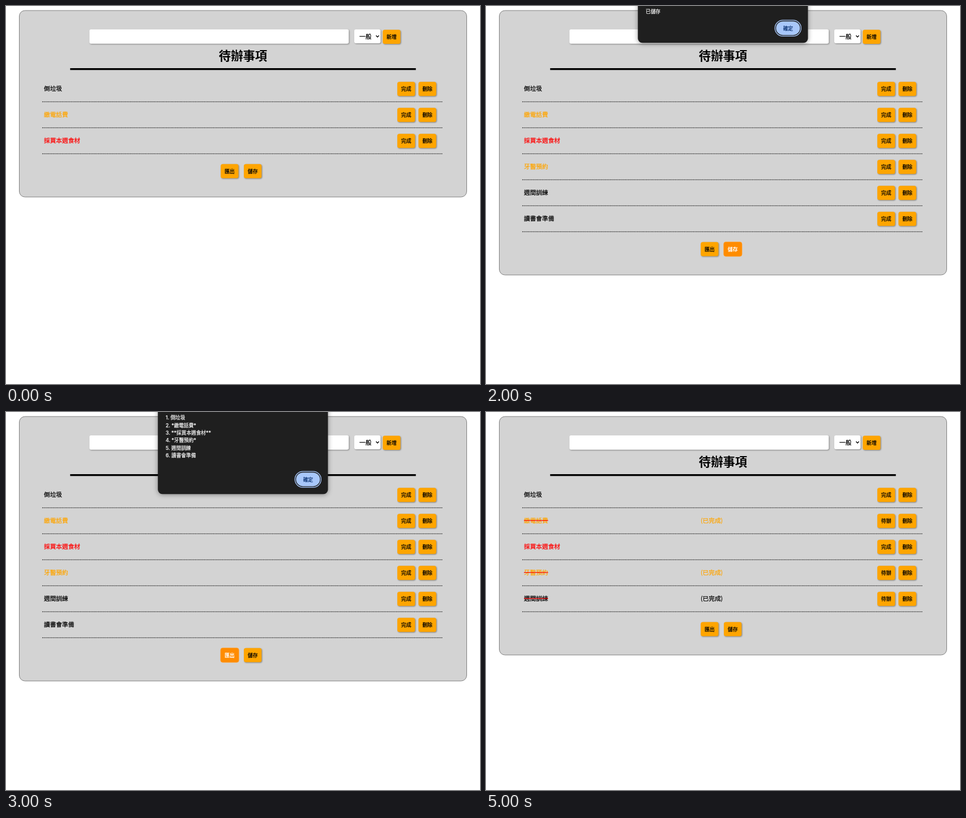
Recreate the animation shown at these times as an HTML page. Size 837 by 669 pixels, loop 6000 ms.

```html
<!DOCTYPE html>
<html lang="zh-Hant">
<head>
<meta charset="utf-8">
<title>待辦事項</title>
<style>
  html, body { margin: 0; width: 100%; height: 100%; overflow: hidden; background: #fff; }
  svg { display: block; width: 837px; height: 669px; }
  /* The thin stroke gives the regular face a medium weight. */
  text {
    font-family: "Noto Sans CJK TC", "Noto Sans CJK JP", "Noto Sans CJK", sans-serif;
    font-weight: 500; stroke: currentColor; stroke-width: .25px;
  }
  .bold { font-weight: 700; stroke: none; }
  .dialog text { font-family: Inter, "Noto Sans CJK TC", "Noto Sans CJK JP", "Noto Sans CJK", sans-serif; }
  .raised { filter: drop-shadow(1.33px 1.33px 1.2px #808080); }
  .floating { filter: drop-shadow(0 1.5px 4px rgba(0, 0, 0, .4)); }
</style>
</head>
<body>
<svg id="stage" viewBox="0 0 837 669" xmlns="http://www.w3.org/2000/svg"></svg>
<script>
const STEP = 1000;
const ROW = 46;
const ITEMS = [
  ['倒垃圾', '#000'],
  ['繳電話費', 'orange'],
  ['採買本週食材', 'red'],
  ['牙醫預約', 'orange'],
  ['週間訓練', '#000'],
  ['讀書會準備', '#000']
];
const EXPORTED = ITEMS.map(([name, color], i) => {
  const mark = { orange: '*', red: '**' }[color] || '';
  return `${i + 1}. ${mark}${name}${mark}`;
});
const DONE = [1, 3, 4, 5];

// focus and hover name a button: "add", "save", "export", "toggle5", ...
const STATES = [
  { rows: 3 },
  { rows: 6, focus: 'add' },
  { rows: 6, hover: 'save', dialog: ['已儲存'], dialogBottom: 65.3 },
  { rows: 6, hover: 'export', dialog: EXPORTED, dialogBottom: 145.3 },
  { rows: 6, done: DONE, focus: 'toggle5', hover: 'remove5' },
  { rows: 5, done: DONE }
];

const rect = (x, y, w, h, r, fill, extra = '') =>
  `<rect x="${x}" y="${y}" width="${w}" height="${h}" rx="${r}" fill="${fill}" ${extra}/>`;

// Places text by the vertical middle of its glyphs.
const label = (str, x, middle, size, color = '#000', extra = '') =>
  `<text x="${x}" y="${middle + size * 0.38}" font-size="${size}" fill="${color}" color="${color}" ${extra}>${str}</text>`;

const centered = 'text-anchor="middle"';
const bold = 'class="bold"';

function button(state, id, str, x, y) {
  const w = 31.3, h = 25;
  const hover = state.hover === id;
  let out = hover
    ? rect(x - 0.4, y - 0.4, w + 1.2, h + 0.8, 4, '#ff8c00', 'stroke="#ffa640" stroke-width=".6"')
    : rect(x, y, w, h, 3.5, 'orange', 'class="raised"');
  if (state.focus === id) {
    out += rect(x - 0.9, y - 0.9, w + 1.8, h + 1.8, 4, 'none', 'stroke="#fff"') +
      rect(x, y, w, h, 3.5, 'none', 'stroke="#10479f" stroke-width="1.4"');
  }
  return out + label(str, x + w / 2, y + 12.4, 8.9, hover ? '#fff' : '#000',
    `${centered} ${hover ? bold : ''}`);
}

function header(state) {
  return rect(147.3, 41.3, 458, 25.4, 3, '#fff', 'class="raised"') +
    rect(615, 41.3, 46.5, 24.8, 3, '#fff', 'class="raised"') +
    label('一般', 624, 53.7, 10.67) +
    '<path d="M653.4 52.2l2.6 2.7l2.6-2.7" fill="none" stroke="#000" stroke-width="1.4"/>' +
    button(state, 'add', '新增', 665.3, 42) +
    label('待辦事項', 418.5, 88.2, 21.33, '#000', `${centered} ${bold}`) +
    rect(113.3, 110, 610.4, 3.3, 0, '#000');
}

function row(state, i) {
  const [name, color] = ITEMS[i];
  const top = 134.3 + i * ROW;
  const middle = top + 11.5;
  const done = (state.done || []).includes(i);
  let out = label(name, 67, middle, 10.67, color);
  if (done) {
    out += rect(67, middle - 0.4, name.length * 10.67, 1.4, 0, 'red', 'opacity=".85"') +
      label('(已完成)', 379, middle + 0.3, 10.67, color);
  }
  return out +
    button(state, 'toggle' + i, done ? '待辦' : '完成', 691, top) +
    button(state, 'remove' + i, '刪除', 728.4, top) +
    `<path d="M64.7 ${top + 35.2}H770" stroke="#000" stroke-width="1.5" stroke-linecap="round" stroke-dasharray="0 2.67"/>`;
}

function dialog({ dialog: lines, dialogBottom: bottom }) {
  if (!lines) return '';
  const y = bottom - 40;
  return '<g class="dialog">' +
    rect(268.2, -20, 300.3, bottom + 20, 8, '#1f1f1f', 'class="floating"') +
    lines.map((line, i) => label(line, 282, 10.2 + i * 13.33, 8.67, '#eee')).join('') +
    rect(510.2, y - 0.1, 46.2, 28.2, 14.1, 'none', 'stroke="#a8c7fa" stroke-width="1.3"') +
    rect(512.2, y + 1.9, 42.2, 24.2, 12.1, '#a8c7fa') +
    label('確定', 533.3, y + 14, 8.67, '#062e6f', centered) +
    '</g>';
}

function draw(state) {
  const footer = 141.8 + state.rows * ROW;
  return rect(23.5, 8, 790, 192 + state.rows * ROW, 10, '#d3d3d3', 'stroke="#808080"') +
    header(state) +
    ITEMS.slice(0, state.rows).map((_, i) => row(state, i)).join('') +
    button(state, 'export', '匯出', 379.2, footer) +
    button(state, 'save', '儲存', 420, footer) +
    dialog(state);
}

const stage = document.getElementById('stage');
let shown = -1;

function tick() {
  const index = Math.floor(performance.now() / STEP) % STATES.length;
  if (index !== shown) {
    shown = index;
    stage.innerHTML = draw(STATES[index]);
  }
  requestAnimationFrame(tick);
}
tick();
</script>
</body>
</html>
```
